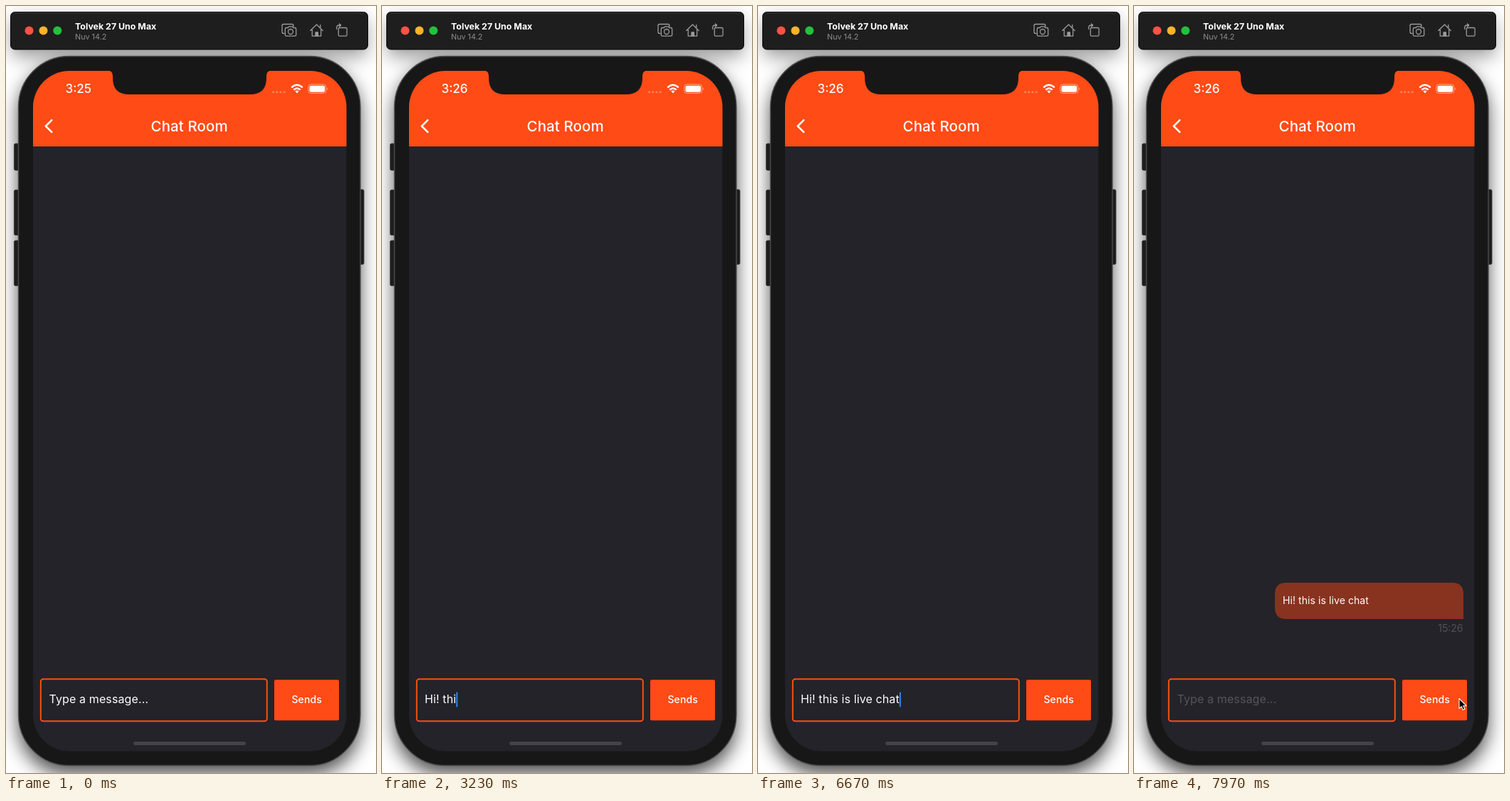
These frames come from a looping animation (520x1076 px, 8 s). An HTML page:

```html
<!DOCTYPE html>
<html lang="en">
<head>
<meta charset="utf-8">
<title>Chat Room</title>
<style>
  html, body { margin: 0; width: 100%; height: 100%; overflow: hidden; background: #fff; }
  svg { display: block; width: 520px; height: 1076px; }
  text { font-family: Inter, Roboto, sans-serif; fill: #fff; white-space: pre; }
  .orange { fill: #ff4b16; }
  .icon { fill: none; stroke: #9b9b9b; stroke-width: 1.3; stroke-linejoin: round; stroke-linecap: round; }
  .field { font-size: 16px; letter-spacing: .12px; }
</style>
</head>
<body>
<svg viewBox="0 0 520 1076">
  <defs>
    <filter id="soft" x="-20%" y="-20%" width="140%" height="140%"><feGaussianBlur stdDeviation="13"/></filter>
    <clipPath id="screen"><rect x="38" y="91" width="440.5" height="954.5" rx="51"/></clipPath>
  </defs>
  <rect width="520" height="1076" fill="#fff"/>

  <!-- Shadows -->
  <g filter="url(#soft)">
    <rect x="17" y="82" width="481" height="996" rx="70" opacity=".68"/>
    <rect x="8" y="18" width="499" height="53" rx="6" opacity=".4"/>
  </g>

  <!-- Window bar -->
  <rect x="6.5" y="8.5" width="502" height="52.5" rx="6" fill="#1e1e1e" stroke="#080808"/>
  <path d="M12 9.6H503" stroke="#444" stroke-width=".8"/>
  <circle cx="32.5" cy="34.5" r="6" fill="#ff5148"/>
  <circle cx="52.5" cy="34.5" r="6" fill="#ffb32c"/>
  <circle cx="72.3" cy="34.5" r="6" fill="#21c23d"/>
  <text x="97" y="33" font-size="12.4" font-weight="700">Tolvek 27 Uno Max</text>
  <text x="97" y="46.5" font-size="10.8" style="fill:#8d8d8d">Nuv 14.2</text>
  <g class="icon">
    <path d="M391 38.5h-1q-2 0-2-2V27.5q0-2 2-2h12q2 0 2 2v1"/>
    <path d="M394 30.5h2.2l1.3-1.7h5l1.3 1.7h2.2q1.7 0 1.7 1.7v8.3q0 1.7-1.7 1.7h-12q-1.7 0-1.7-1.7v-8.3q0-1.7 1.7-1.7z"/>
    <circle cx="400" cy="36" r="3.5"/>
    <path d="M427.8 34.5L436.5 26l8.7 8.5M430.3 33v9.2h12.4V33M441.8 30.5v-4"/>
    <rect x="435" y="37" width="3.4" height="5" fill="#9b9b9b"/>
    <rect x="467.3" y="30.5" width="11.8" height="11.7" rx="1.7"/>
    <path d="M464.8 32.5v-2q0-3.5 3.5-3.5h2M468.4 25l2.4 2-2.4 2"/>
  </g>

  <!-- Handset -->
  <g fill="#1d1d1e" stroke="#363636" stroke-width=".8">
    <rect x="11.4" y="193" width="9" height="37.5" rx="2"/>
    <rect x="11.4" y="258" width="9" height="63.5" rx="2"/>
    <rect x="11.4" y="329" width="9" height="63.5" rx="2"/>
    <rect x="494" y="257.5" width="9" height="105" rx="2"/>
  </g>
  <rect x="17.5" y="70.5" width="480.5" height="995" rx="71" fill="#171717" stroke="#4e4e4e" stroke-width="1.4"/>
  <g clip-path="url(#screen)">
    <rect x="38" y="91" width="441" height="955" fill="#242329"/>
    <rect class="orange" x="38" y="91" width="441" height="106"/>
    <path d="M143 90.5q7 .5 7 7.5v3q0 23 23 23h170q23 0 23-23v-3q0-7 7-7.5z" fill="#171717"/>
  </g>

  <!-- Status bar and header -->
  <text id="clock" x="83.5" y="122" font-size="17" font-weight="500"></text>
  <g fill="#ff8055">
    <circle cx="375.5" cy="120.8" r="1.6"/><circle cx="380.7" cy="120.8" r="1.6"/>
    <circle cx="385.9" cy="120.8" r="1.6"/><circle cx="391.1" cy="120.8" r="1.6"/>
  </g>
  <g fill="none" stroke="#fff" stroke-width="2.4">
    <path d="M401.2 114.3q7.8-7 15.6 0"/>
    <path d="M404.2 117.6q4.8-4.3 9.6 0"/>
  </g>
  <path d="M406.4 119.6q2.6-2 5.2 0l-2.6 2.9z" fill="#fff"/>
  <rect x="424.8" y="110" width="25" height="12.4" rx="3.4" fill="none" stroke="#ffa88b"/>
  <rect x="426.5" y="111.7" width="21.6" height="9" rx="2" fill="#fff"/>
  <path d="M451.2 114.2q2 2 0 4z" fill="#ffa88b"/>
  <path d="M65 159.3L55.8 168.5 65 177.7" fill="none" stroke="#fff" stroke-width="2.5"/>
  <text x="257.7" y="175.6" font-size="20.4" font-weight="500" letter-spacing=".15" text-anchor="middle">Chat Room</text>

  <!-- Sent message -->
  <g id="sent">
    <path d="M214 809H447q16 0 16 16V860H214q-16 0-16-16V825q0-16 16-16z" fill="#87331f"/>
    <text x="209" y="839" font-size="14" letter-spacing=".08">Hi! this is live chat</text>
    <text x="462.5" y="878.3" font-size="14" text-anchor="end" style="fill:#515156">15:26</text>
  </g>

  <!-- Composer -->
  <rect x="48.8" y="944.3" width="318" height="59" rx="3.5" fill="none" stroke="#ff4b16" stroke-width="2"/>
  <text id="hint" class="field" x="60.5" y="978">Type a message...</text>
  <text id="typed" class="field" x="60" y="978"></text>
  <rect id="caret" y="962.5" width="2" height="21" rx="1" fill="#2f86ee"/>
  <rect class="orange" x="377" y="945.3" width="91" height="57" rx="2"/>
  <text x="422.7" y="978.3" font-size="14" font-weight="500" letter-spacing=".15" text-anchor="middle">Sends</text>
  <rect x="179" y="1032" width="158" height="5" rx="2.5" fill="#444448"/>

  <path id="mouse" d="M0 0V14.2L3.3 11.2 5.4 16.1 7.9 15 5.8 10.3H10.2Z" fill="#000" stroke="#fff" stroke-width="1.1" stroke-linejoin="round"/>
</svg>
<script>
const LOOP = 8000, SEND = 7870, CLOCK = 830, ENTER = 7400;
const MESSAGE = 'Hi! this is live chat';
// Moment of each key press, in ms
const KEYS = [1380, 1640, 2040, 2300, 2880, 3040, 3200, 3380, 3530, 3710, 3860,
  4020, 4190, 4420, 4660, 4900, 5150, 5400, 5640, 5860, 6060];
// Pointer stops: time, x, y
const ROUTE = [[7400, 508, 983], [7470, 485, 976], [7600, 463, 972], [7720, 457, 971.5]];

const $ = id => document.getElementById(id);
const [clock, sent, hint, typed, caret, mouse] =
  ['clock', 'sent', 'hint', 'typed', 'caret', 'mouse'].map($);
const clamp = v => Math.max(0, Math.min(1, v));
const show = (el, on) => el.setAttribute('visibility', on ? 'visible' : 'hidden');
const easeOut = p => 1 - (1 - p) ** 2;

// Half a second per state, with a 250 ms fade at the start of each
function blink(age) {
  const p = easeOut(clamp((age % 500) / 250));
  return Math.floor(age / 500) % 2 ? 1 - p : p;
}

function caretAlpha(t, count) {
  if (t >= SEND) return 0;
  if (!count) return t < 30 ? 0 : blink(t - 30);
  const age = t - KEYS[count - 1];
  return age < 650 ? 1 : blink(age - 150);
}

function pointerAt(t) {
  const i = ROUTE.findIndex(stop => stop[0] > t);
  if (i < 1) return ROUTE[ROUTE.length - 1].slice(1);
  const [a, b] = [ROUTE[i - 1], ROUTE[i]];
  const p = (t - a[0]) / (b[0] - a[0]);
  return [1, 2].map(k => a[k] + (b[k] - a[k]) * p);
}

function draw(t) {
  const done = t >= SEND;
  const count = done ? 0 : KEYS.filter(k => k <= t).length;
  const text = MESSAGE.slice(0, count);
  if (typed.textContent !== text) typed.textContent = text;
  clock.textContent = t < CLOCK ? '3:25' : '3:26';

  hint.setAttribute('opacity', done ? 0.22 * clamp((t - SEND) / 100)
    : 1 - clamp((t - KEYS[0]) / 150));
  caret.setAttribute('x', 60 + (count ? typed.getComputedTextLength() : 0));
  caret.setAttribute('opacity', caretAlpha(t, count));

  show(sent, done);
  show(mouse, t >= ENTER);
  mouse.setAttribute('transform', `translate(${pointerAt(t)})`);
}

let start;
function tick(now) {
  start ??= now;
  draw((now - start) % LOOP);
  requestAnimationFrame(tick);
}
draw(0);
requestAnimationFrame(tick);
</script>
</body>
</html>
```
